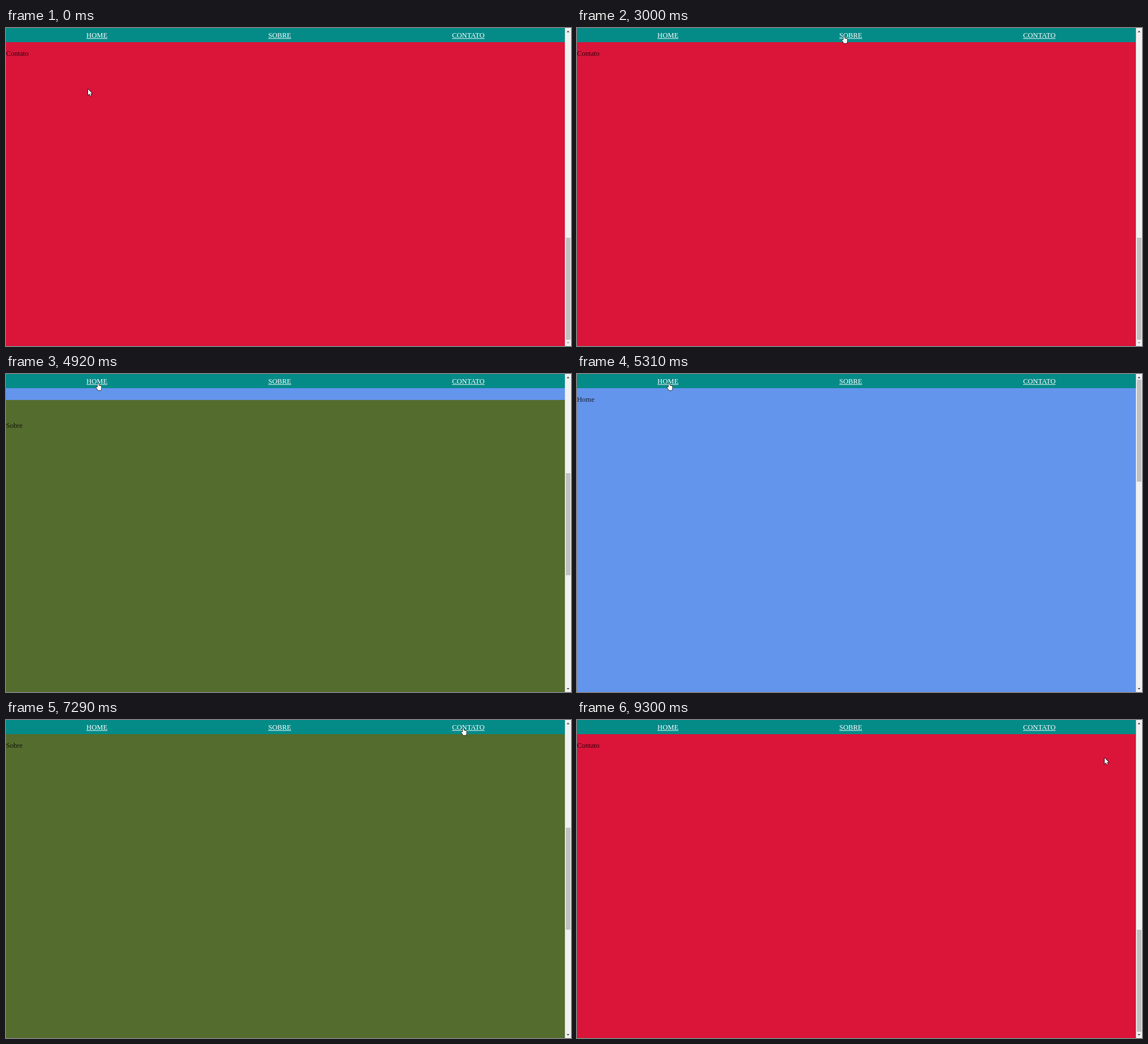
An HTML page with a canvas that plays this animation: 998x561 px, repeating every 9450 ms.

```html
<!DOCTYPE html>
<html lang="pt">
<head>
<meta charset="utf-8">
<title>Menu</title>
<style>
  html, body { margin: 0; width: 100%; height: 100%; overflow: hidden; }
  canvas { display: block; width: 998px; height: 561px; }
</style>
</head>
<body>
<canvas id="stage" width="998" height="561"></canvas>
<script>
const ctx = document.getElementById('stage').getContext('2d');
const W = 998, H = 561, VIEW = 987.4, NAV = 25;
const LOOP = 9450, STEP = 30, SCROLL_MS = 460;

ctx.font = '12.57px "Liberation Serif", "Times New Roman", serif';
ctx.fontKerning = 'normal';

const sections = [
  { name: 'Home', color: '#6495ed' },
  { name: 'Sobre', color: '#546c2d' },
  { name: 'Contato', color: '#db143a' }
];
const END = (sections.length - 1) * H;

// Menu links share the free width evenly
const links = sections.map(({ name }) => {
  const label = name.toUpperCase();
  return { label, w: ctx.measureText(label).width };
});
const gap = (VIEW - links.reduce((sum, l) => sum + l.w, 0)) / links.length;
links.reduce((x, l) => (l.x = x) + l.w + gap, gap / 2);

const over = (i, dx, y) => ({ x: links[i].x + links[i].w / 2 + dx, y });

const clicks = [
  { at: 3580, section: 1 }, { at: 4828, section: 0 },
  { at: 6281, section: 1 }, { at: 7372, section: 2 }
];

const home = { x: 145, y: 108 };
const moves = [
  { from: 30, to: 810, x: 889, y: 68 },
  { from: 1440, to: 1680, x: 1004, y: 2 },
  { from: 2010, to: 2970, ...over(1, -12, 14), dip: 88 },
  { from: 3000, to: 3450, ...over(1, 3, 14) },
  { from: 4020, to: 4620, ...over(0, 2, 16) },
  { from: 5580, to: 6060, ...over(1, 8, 15) },
  { from: 6360, to: 7260, ...over(2, -9, 14) },
  { from: 8850, to: 9300, x: 932, y: 67 }
];

const mix = (a, b, p) => a + (b - a) * p;
const smooth = p => p * p * (3 - 2 * p);

// cubic-bezier(.42, 0, .58, 1)
function easeInOut(x) {
  let lo = 0, hi = 1;
  for (let i = 0; i < 24; i++) {
    const u = (lo + hi) / 2, v = 1 - u;
    if (3 * v * v * u * 0.42 + 3 * v * u * u * 0.58 + u * u * u < x) lo = u;
    else hi = u;
  }
  return smooth(lo);
}

function scrollAt(t) {
  let y = END;
  for (const { at, section } of clicks) {
    if (t < at) break;
    y = mix(y, section * H, easeInOut(Math.min(1, (t - at) / SCROLL_MS)));
  }
  return y;
}

function pointerAt(t) {
  let { x, y } = home;
  for (const m of moves) {
    if (t < m.from) break;
    const p = smooth(Math.min(1, (t - m.from) / (m.to - m.from)));
    x = mix(x, m.x, p);
    y = mix(y, m.y, p) + (m.dip || 0) * Math.sin(Math.PI * p);
  }
  return { x, y };
}

function rect(x, y, w, h, color) {
  ctx.fillStyle = color;
  ctx.fillRect(x, y, w, h);
}

function text(s, x, y, color) {
  ctx.fillStyle = color;
  ctx.fillText(s, x, y);
}

function drawPage(scroll) {
  sections.forEach(({ name, color }, i) => {
    const y = i * H - scroll;
    if (y <= -H || y >= H) return;
    rect(0, y, VIEW, 2 * H, color);
    text(name, 0, Math.round(y) + 49, 'rgba(0, 0, 0, 0.8)');
  });
}

function drawNav() {
  rect(0, 0, VIEW, NAV, '#048b88');
  for (const { label, x, w } of links) {
    text(label, x, 17, '#fff');
    rect(x, 18.2, w, 0.9, '#fff');
  }
}

// Triangle button; dir is -1 for up, 1 for down
function drawButton(y, dir, active) {
  ctx.beginPath();
  ctx.moveTo(990.3, y - dir * 1.4);
  ctx.lineTo(992.8, y + dir * 1.4);
  ctx.lineTo(995.3, y - dir * 1.4);
  ctx.fillStyle = active ? '#505050' : '#a3a3a3';
  ctx.fill();
}

function drawScrollbar(scroll) {
  const thumb = 180;
  rect(VIEW, 0, W - VIEW, H, '#f1f1f1');
  rect(989, Math.round(10 + scroll / H * thumb), 8, thumb, '#c1c1c1');
  drawButton(6, -1, scroll > 0);
  drawButton(H - 5.6, 1, scroll < END);
}

function arrowPath() {
  const path = new Path2D('M0 0V16L3.8 12.6L6.4 18.4L8.8 17.3L6.3 11.7H11.3Z');
  return path;
}

// Index finger, three folded fingers, palm and thumb
function handPath() {
  const path = new Path2D();
  path.roundRect(-1.5, 0.5, 3, 14, 1.5);
  for (let i = 1; i < 4; i++) path.roundRect(i * 2.6 - 1.3, 5.5 + i * 0.7, 2.6, 8, 1.3);
  path.roundRect(-2, 10.5, 11, 9.5, [1, 1, 4, 4]);
  path.moveTo(-1, 18);
  path.lineTo(-5.5, 12);
  path.lineTo(-4, 10.5);
  path.lineTo(-1, 13);
  path.closePath();
  return path;
}

const arrow = arrowPath(), hand = handPath();

function drawPointer({ x, y }) {
  const onLink = y < NAV - 3 && links.some(l => Math.abs(x - l.x - l.w / 2) < l.w / 2 + 6);
  const shape = onLink ? hand : arrow;
  ctx.save();
  ctx.translate(x, y);
  ctx.scale(0.64, 0.64);
  ctx.lineJoin = 'round';
  ctx.lineWidth = 2;
  ctx.strokeStyle = '#000';
  ctx.fillStyle = '#fff';
  ctx.stroke(shape);
  ctx.fill(shape);
  ctx.restore();
}

function draw(now) {
  const t = Math.floor((now % LOOP) / STEP) * STEP;
  const scroll = scrollAt(t);
  drawPage(scroll);
  drawNav();
  drawScrollbar(scroll);
  drawPointer(pointerAt(t));
}

let begin;
function tick(now) {
  begin ??= now;
  draw(now - begin);
  requestAnimationFrame(tick);
}
draw(0);
requestAnimationFrame(tick);
</script>
</body>
</html>
```
